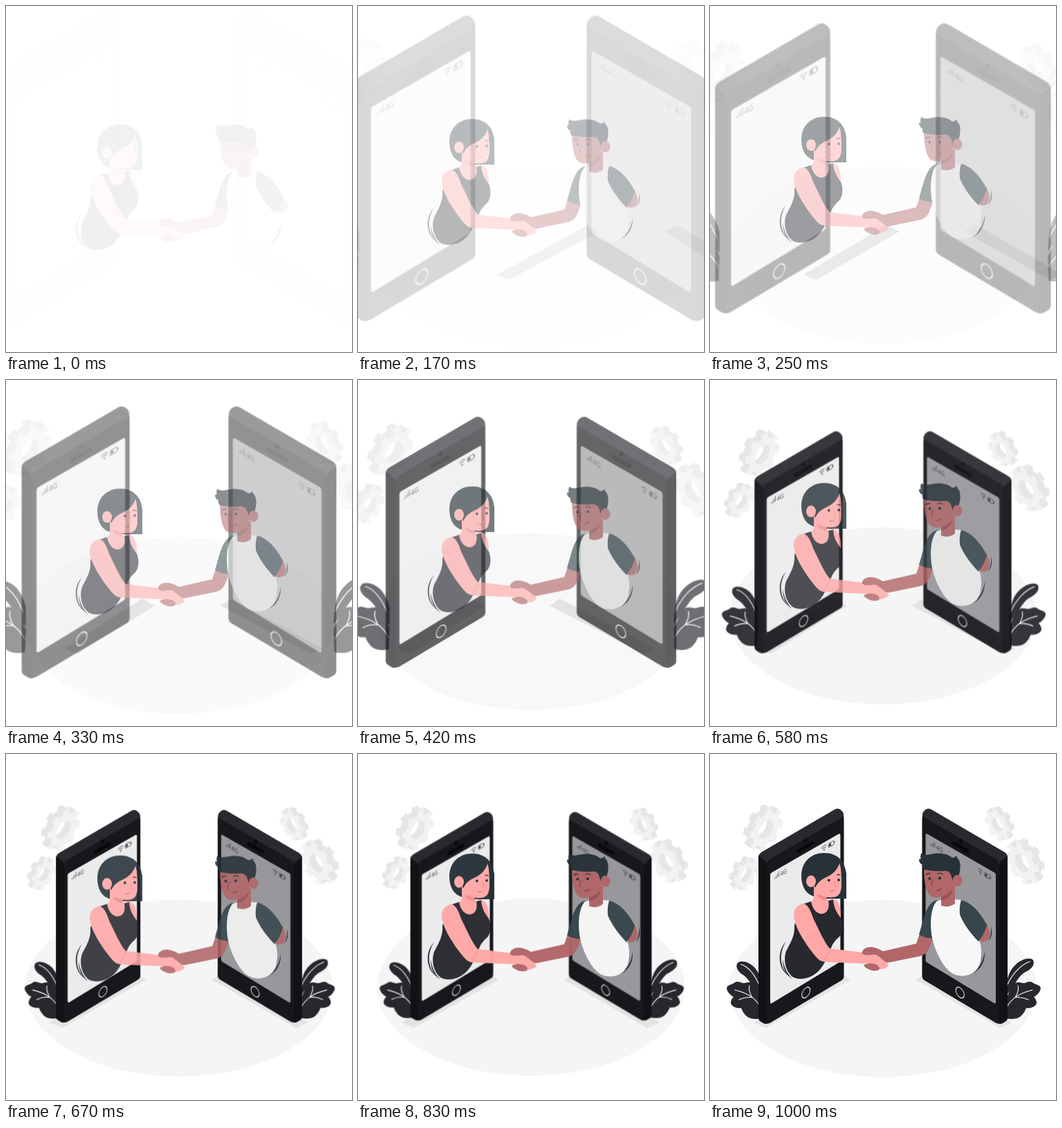
An HTML page without scripts for the animation above (1.04 s loop, 500 px wide and 500 px high).

```html
<!DOCTYPE html>
<html lang="en">
<head>
<meta charset="utf-8">
<title>Handshake through phones</title>
<style>
html, body { margin: 0; width: 100%; height: 100%; overflow: hidden; background: #fff; }
svg { display: block; width: 500px; height: 500px; }

.floor, .shadows, .gears, .plants, .phones, .people { animation: 1040ms linear infinite both; }
.floor { animation-name: rise; }
.shadows { animation-name: dash; transform-origin: 250px 357px; }
.gears, .plants, .phones { animation-name: zoom; }
.gears { transform-origin: 256px 136px; }
.plants { transform-origin: 251px 339px; }
.phones { transform-origin: 250px 234.5px; }
.people { animation-name: slide; }

@keyframes rise {
  0% { opacity: .005; transform: translateY(29.9px); animation-timing-function: cubic-bezier(.345,.089,.499,1.367); }
  92.3%, 100% { opacity: 1; transform: translateY(0); }
}
@keyframes zoom {
  0% { opacity: .005; transform: scale(1.4976); animation-timing-function: cubic-bezier(.345,.089,.499,1.367); }
  92.3%, 100% { opacity: 1; transform: scale(1); }
}
@keyframes slide {
  0% { opacity: .066; transform: translateY(28px); animation-timing-function: cubic-bezier(.144,.239,.631,1); }
  92.3%, 100% { opacity: 1; transform: translateY(0); }
}
@keyframes dash {
  0% { opacity: .014; transform: translateX(246px) skewX(-19.6deg); animation-timing-function: cubic-bezier(.335,.148,.499,1.361); }
  53.85% { opacity: 1; transform: translateX(0) skewX(10deg); animation-timing-function: cubic-bezier(.36,-.01,.5,1.38); }
  73.08% { opacity: 1; transform: translateX(0) skewX(-2deg); animation-timing-function: cubic-bezier(.36,-.01,.5,1.38); }
  92.3%, 100% { opacity: 1; transform: translateX(0) skewX(0deg); }
}

.ink { fill: #263238; }
.leaf { fill: #27282e; }
.top { fill: #27292f; }
.sleeve { fill: #36474c; }
.pale { fill: #ffa8a7; }
.tan { fill: #b16668; }
.line { fill: none; stroke: #263238; stroke-width: 1.4; stroke-linecap: round; }
.vein { fill: none; stroke: #fff; stroke-width: 1.1; stroke-linecap: round; }
.status { fill: #37393c; font: 8.6px "Open Sans", "Noto Sans", sans-serif; }
.status .wire { fill: none; stroke: #37393c; stroke-width: .8; }
</style>
</head>
<body>
<svg viewBox="0 0 500 500">
<defs>
  <g id="cog" fill="none" stroke="currentColor">
    <circle r="17" stroke-width="10"/>
    <circle r="24.5" stroke-width="7" pathLength="16" stroke-dasharray="1 1"/>
  </g>
  <!-- extruded cog on the left-facing plane -->
  <g id="gear">
    <g color="#e6e6e6">
      <use href="#cog" transform="matrix(.866 -.5 0 1 -9 -5)"/>
      <use href="#cog" transform="matrix(.866 -.5 0 1 -6.8 -3.8)"/>
      <use href="#cog" transform="matrix(.866 -.5 0 1 -4.5 -2.5)"/>
      <use href="#cog" transform="matrix(.866 -.5 0 1 -2.2 -1.2)"/>
    </g>
    <use href="#cog" color="#f2f2f2" transform="matrix(.866 -.5 0 1 0 0)"/>
  </g>
  <g id="phone">
    <path fill="#111216" d="M70 149Q70 145 75 142L181 81L193.3 90V321Q193.3 325 190 327L87 388Q81.5 391.5 77 389L73 386.5Q70 385 70 381Z"/>
    <path fill="#292a2f" d="M70.4 147Q71 144 75 141.6L180 80.3Q184.5 77.8 188.6 80.4Q193.3 83.4 193.3 89L84 152.8Q82 154 82 157Z"/>
    <path fill="#17181c" d="M82 158Q82 154 85 152.3L189 91.8Q193.3 89.4 193.3 94V321Q193.3 325 190 327L87 388.4Q82 391.3 82 385Z"/>
    <path fill="none" stroke="#3a3b41" stroke-width=".6" d="M82 159Q82 154 85 152.3L189 91.8Q192 90 193 89"/>
    <path fill="currentColor" d="M87 175Q87 172.4 89.2 171.2L186 115.6Q188.4 114.3 188.4 117V297.5Q188.4 300 186.4 301.2L89.6 360Q87 361.4 87 358.6Z"/>
    <ellipse cx="138" cy="125.2" rx="2.4" ry="3" fill="#08090b"/>
    <path stroke="#08090b" stroke-width="5" stroke-linecap="round" d="M128 140.2L148 128.6"/>
    <circle r="7" fill="none" stroke="#e8e8e8" stroke-width="1.2" transform="matrix(.866 -.5 0 1 138.7 344.8)"/>
  </g>
  <g id="status" class="status">
    <path d="M0 0V-2H.8V0ZM2.3 0V-3.8H3.1V0ZM4.6 0V-5.6H5.4V0ZM6.9 0V-7.8H7.7V0Z"/>
    <text x="9.4" y=".6">4G</text>
    <path class="wire" d="M78.8 -5Q83 -9 87.2 -5M80.5 -3Q83 -5.4 85.5 -3"/>
    <circle cx="83" cy="-.9" r="1"/>
    <rect class="wire" x="90.5" y="-6.2" width="9" height="5.6" rx="1"/>
    <path d="M91.5 -5.2H94.5V-1.6H91.5ZM100 -4.6H101V-2.2H100Z"/>
  </g>
  <path id="strip" fill="#e3e3e3" d="M63 388L81 396L203 326L186 316Z"/>
  <g id="bush">
    <path class="leaf" d="M74 382C65 384 56 383 51 377Q47 373 45 367C39 368 31 365 30 360Q30 355 34 351C28 348 22 340 25 336C28 333 33 333 36 330C41 327 46 332 50 331C57 329 64 330 67 338L75 356Z"/>
    <path class="vein" d="M74 367C66 353 56 346 36 341M57 335Q55 341 60 350M42 355Q52 350 62 352"/>
  </g>
</defs>

<ellipse class="floor" cx="250" cy="339" rx="222" ry="128" fill="#f5f5f5"/>

<g class="shadows">
  <use href="#strip"/>
  <use href="#strip" transform="matrix(-1 0 0 1 500 0)"/>
</g>

<g class="gears">
  <use href="#gear" transform="translate(81 109)"/>
  <use href="#gear" transform="translate(52 174.5) scale(.75)"/>
  <use href="#gear" transform="translate(415 102.5) scale(-.75 .75)"/>
  <use href="#gear" transform="translate(451 158) scale(-1 1)"/>
</g>

<g class="plants">
  <use href="#bush"/>
  <use href="#bush" transform="matrix(-1 0 0 1 502 0)"/>
  <path class="leaf" d="M75 352C65 344 59 328 49 320C40 315 36 307 40 302C45 297 57 301 64 308C70 315 73 322 75 330Z"/>
  <path class="vein" d="M45 304C57 308 65 319 72 336"/>
  <path class="leaf" d="M427 350C428 327 431 314 442 304C451 296 463 293 467 298C470 305 464 311 456 315C445 320 440 337 427 350Z"/>
  <path class="vein" d="M462 300C448 305 436 319 429 335"/>
</g>

<g class="phones">
  <use href="#phone" color="#ebebec"/>
  <use href="#phone" color="#98989c" transform="matrix(-1 0 0 1 500 0)"/>
  <use href="#status" transform="matrix(.866 -.5 0 1 93 181)"/>
  <use href="#status" transform="matrix(.866 .5 0 1 318.5 132)"/>
</g>

<g class="people">
  <!-- motion marks -->
  <path class="ink" d="M110 271C97 284 97 310 114 321C100 308 99.5 287 110 271ZM105 296C105 309 109 319 119 325C111 317 107 308 105 296Z"/>
  <path class="ink" d="M397 285C398 308 383 322 358 320C381 320 394 308 397 285ZM393 289Q392 301 384 308Q391 299 393 289ZM406 249Q410 262 402 271Q407 261 406 249Z"/>

  <!-- woman -->
  <path class="ink" d="M197 209H168L151 206C139 203 132 192 132 176C132 156 146 143 165 143C185 143 197 156 197 178Z"/>
  <path class="pale" d="M174 209C184 209 189 216 189 237L178 228Z"/>
  <path class="pale" d="M150 190H168V211Q173 212 177 212L176 232L150 234L134 219Q149 214 150 208Z"/>
  <path fill="#f08a8b" d="M154 204Q160 211 169 212L168 200Z"/>
  <path class="pale" d="M187 157C190 165 190 176 190 188C190 200 187 206 178 207C165 208 154 204 151 192C150 184 158 174 168 170Z"/>
  <path class="ink" d="M152 156L188 154C186 167 176 175 166 179Q157 183 152 193L146 180Z"/>
  <ellipse class="pale" cx="146" cy="184" rx="7" ry="8.4"/>
  <path class="ink" d="M186 154C191 165 190 180 190 203L186 209H197V172Z"/>
  <circle class="ink" cx="171.8" cy="182.5" r="1.9"/>
  <circle class="ink" cx="186" cy="182" r="1.9"/>
  <path class="line" d="M184 174.5Q186 173.5 188 175"/>
  <path d="M179 184Q183 191 179 192" fill="none" stroke="#f58788" stroke-width="1.2"/>
  <path d="M173 197.5Q176 199.5 179 197" fill="none" stroke="#df6c74" stroke-width="1.2" stroke-linecap="round"/>
  <path class="top" d="M134 217L146 213C148 224 154 231 162 231C170 230 173 222 171 212L178 210.5C179 224 184 230 189 237C193 246 192 258 187 264C181 269 177 274 175 280C169 294 164 309 153 317C143 325 130 327 121 323C108 315 106 296 110 285C117 271 123 263 122 247Z"/>
  <path class="pale" d="M136 216C127 217 120 224 121 235C123 252 140 278 154 294Q159 300 167 300.5L226 303L235 312Q245 312 252 309Q258 307 257.5 304Q248 295 241 289L222 287L173 281C166 273 159 258 149 237Q144 220 136 216Z"/>
  <path fill="none" stroke="#e88b8c" stroke-width=".8" d="M164 299Q170 291 174 282"/>

  <!-- man -->
  <path class="tan" d="M388 268L399 244Q405 255 404 263Q402 271 396 271Q391 272 388 268Z"/>
  <path class="tan" d="M303 260L298 274L250 285C240 279 231 278 226 280Q219 283 220 288Q224 292 233 290L246 300Q252 302 260 301L304 292Q314 289 317 280L323 265Z"/>
  <path class="sleeve" d="M328 211C317 214 312 226 308 240L302 261Q312 267 322 266L329 235Z"/>
  <path fill="#f7f7f7" d="M327 213L336 210H352L364 211C366 232 379 248 387 264C395 281 393 301 386 311C377 322 361 323 350 317C335 307 323 280 320 260C318 241 319 224 327 213Z"/>
  <path class="sleeve" d="M363 211C376 214 389 226 400 247Q397 260 388 271C377 260 366 245 361 232Q360 219 363 211Z"/>
  <path class="tan" d="M334 190H354V216Q345 223 334 219Z"/>
  <path fill="#984f54" d="M334 205Q345 204 351 195Q349 208 334 212Z"/>
  <path class="tan" d="M309 160H352C355 179 353 195 344 202C336 208 325 209 319 205C311 199 309 179 309 160Z"/>
  <path class="ink" d="M305 143.5Q311 147 318 145C330 142 343 143 350 150Q353 150 357 147Q356 150 359 152C363 158 362 168 359 177L351 184L348 174Q345 168 337 169C326 170 316 168 309 167Q306 164 307 160Q302 158 302 152Q306 152 304 149Z"/>
  <ellipse class="tan" cx="357.5" cy="183" rx="7" ry="8.3"/>
  <circle class="ink" cx="317.5" cy="180" r="2.1"/>
  <circle class="ink" cx="332" cy="179.5" r="2.1"/>
  <path class="line" d="M312 174.5Q315 171.5 318 173M329 173Q332 171 336 173.5"/>
  <path d="M323 181Q318 190 322 191.5" fill="none" stroke="#924a50" stroke-width="1.6"/>
  <path d="M328 197Q331 197.5 334 194.5" fill="none" stroke="#7d3941" stroke-width="1.2" stroke-linecap="round"/>

  <!-- clasped hands -->
  <path class="pale" d="M220 293Q226 288 234 290Q240 289 243 292L257 303Q259 307 253 309Q247 313 243 309Q238 303 230 303L220 301Z"/>
  <path class="tan" d="M222 305Q231 300.5 240 304Q247 308 244 312Q237 315 229 311Q223 308 222 305Z"/>
  <path fill="none" stroke="#984f54" stroke-width=".8" d="M220 288Q228 292 235 289"/>
</g>
</svg>
</body>
</html>
```
